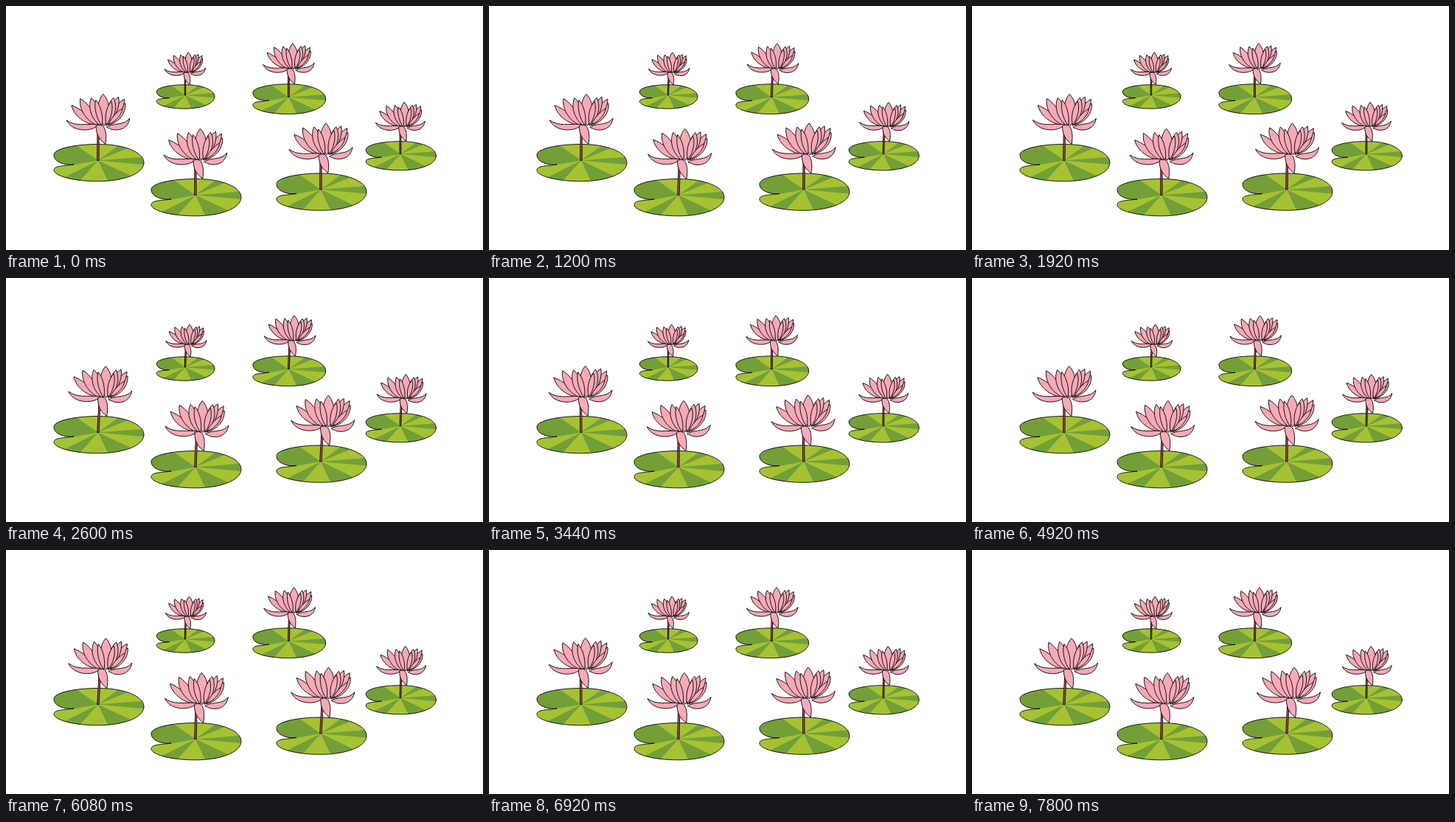
Recreate the animation shown at these times as an HTML page with a canvas. Size 647x331 px, loop 7.84 s.

```html
<!DOCTYPE html>
<html lang="en">
<head>
<meta charset="utf-8">
<title>Water lilies</title>
<style>
  html, body { margin: 0; width: 100%; height: 100%; overflow: hidden; background: #fff; }
  canvas { display: block; }
</style>
</head>
<body>
<canvas width="647" height="331"></canvas>
<script>
const ctx = document.querySelector('canvas').getContext('2d');
const LOOP = 7840, STEP = 40, PERIOD = 1840;
const PINK = '#f8a9b6', LIGHT = '#a5c233', DARK = '#739f38', STEM = '#b9505a', INK = '#0c0c0c';

// Foot of the stem, scale, sway strength, time of the leftmost pose
const lilies = [
  [243, 121, 0.645, 0.6, 0],
  [383.5, 123.7, 0.81, 0.6, 0],
  [535, 200.8, 0.78, 0.6, 0],
  [125, 209.5, 1, 1, 1540],
  [427, 249, 1, 1, 1540],
  [257, 256.5, 1, 0.6, 0]
];

const pad = new Path2D(`M-33 5.5 C-43 7 -60 3 -60 -7.5 C-60 -16 -32 -22 0 -22
  C36 -22 62 -11 62 3 C62 18 34 28.3 0 28.3 C-34 28.3 -60 21 -60 13
  C-60 7 -46 7.5 -33 5.5Z`);
const wedges = new Path2D(`M0 0 L-36 -25 H-70 V6 H-33Z M0 0 L34 -25 H60Z
  M0 0 L66 -5 V6Z M0 0 L15 32 L57 27Z M0 0 L-58 29 H-26Z`);

// Leaf shape from base to tip, with a bulge on its left and right side
function petal(bx, by, tx, ty, left, right) {
  const dx = tx - bx, dy = ty - by, len = Math.hypot(dx, dy);
  const at = (k, w) => `${bx + dx * k + dy / len * w} ${by + dy * k - dx / len * w} `;
  return new Path2D(`M${bx} ${by}C${at(0.3, left)}${at(0.75, left)}${tx} ${ty}` +
    `C${at(0.75, -right)}${at(0.3, -right)}${bx} ${by}Z`);
}

const petals = [
  petal(-1, -48, -35, -75, 9, 4),
  petal(15, -48, 38, -77, 5, 9),
  petal(14, -48, 37, -83, 6, 7),
  petal(13, -48, 29, -86, 7, 7),
  petal(1, -47, -23, -84, 10, 6),
  petal(4, -47, -8, -85, 9, 6),
  petal(12, -47, 22, -85, 6, 9),
  petal(9, -47, 8, -90, 10, 10),
  petal(6, -47, -2, -82, 5, 5),
  petal(12, -48, 19, -80, 5, 5),
  petal(15, -49, 34, -70, 3, 5),
  new Path2D('M-42 -55 C-30 -46 -16 -50 -1 -49 C5 -47 1 -46 -3 -45 C-13 -39 -35 -40 -42 -55Z'),
  new Path2D('M44 -57 C36 -47 25 -51 14 -46 C10 -44 14 -45 19 -42 C31 -39 42 -44 44 -57Z'),
  new Path2D('M-2 -47 C-2 -34 3 -28 10.5 -22 C12 -31 12 -40 8 -46 C5 -49 1 -48 -2 -47Z')
];

function paint(path, color) {
  ctx.fillStyle = color;
  ctx.fill(path);
  ctx.stroke(path);
}

function drawLily([x, y, scale, strength, start], time) {
  const sway = -strength * Math.cos(2 * Math.PI * (time - start) / PERIOD);
  ctx.save();
  ctx.translate(x, y);
  ctx.scale(scale, scale);
  ctx.lineWidth = 0.95 / scale;

  ctx.save();
  ctx.clip(pad);
  ctx.fillStyle = LIGHT;
  ctx.fill(pad);
  ctx.fillStyle = DARK;
  ctx.fill(wedges);
  ctx.restore();
  ctx.stroke(pad);

  const top = 0.9 + 1.6 * sway;
  paint(new Path2D(`M-1.3 0 L${top - 1.1} -46 H${top + 1.1} L1.1 0Z`), STEM);

  ctx.translate(0.9 * sway, 0);
  ctx.rotate(0.018 * sway);
  for (const p of petals) paint(p, PINK);
  ctx.restore();
}

function frame(now) {
  const time = Math.floor(now % LOOP / STEP) * STEP;
  ctx.fillStyle = '#fff';
  ctx.fillRect(0, 0, 647, 331);
  ctx.strokeStyle = INK;
  ctx.lineJoin = 'round';
  for (const lily of lilies) drawLily(lily, time);
  requestAnimationFrame(() => frame(performance.now()));
}
frame(performance.now());
</script>
</body>
</html>
```
